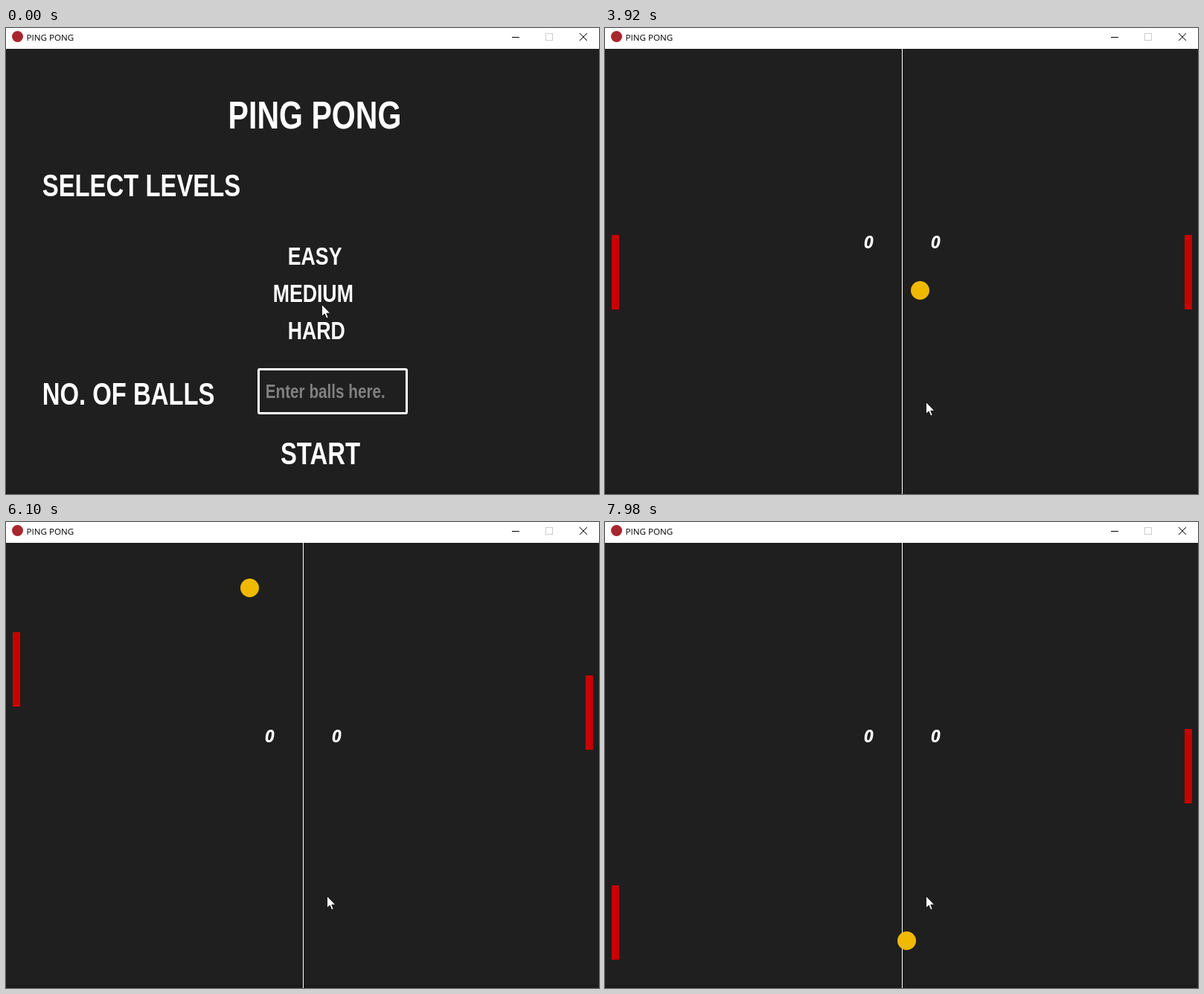
These frames come from a looping animation (797x626 px, 8 s). An HTML page:

```html
<!DOCTYPE html>
<html lang="en">
<head>
<meta charset="utf-8">
<title>Ping Pong</title>
<style>
  html, body { margin: 0; width: 100%; height: 100%; overflow: hidden; background: #1f1f1f; }
  svg { display: block; }
  .caption { font: 11.6px "Open Sans", "Noto Sans", sans-serif; }
  .labels { font-family: "Liberation Sans", Arial, sans-serif; font-weight: bold; fill: #fff; }
  .title { font-size: 52px; }
  .heading { font-size: 41.6px; }
  .level { font-size: 33.8px; }
  .hint { font-size: 26.2px; fill: #808080; }
  .score { font: italic bold 23px "Open Sans", "Noto Sans", sans-serif; fill: #fff; }
  .paddle { fill: #c80000; }
  .crisp { shape-rendering: crispEdges; }
</style>
</head>
<body>
<svg width="797" height="626" viewBox="0 0 797 626">
  <rect width="797" height="626" fill="#1f1f1f"/>
  <rect y="622" width="797" height="4" fill="#1b1b1b"/>

  <g id="menu">
    <!-- condensed face -->
    <g class="labels" transform="scale(.79 1)">
      <text class="title" x="378" y="135.5">PING PONG</text>
      <text class="heading" x="61.7" y="226.5">SELECT LEVELS</text>
      <text class="level" x="479.5" y="318">EASY</text>
      <text class="level" x="454" y="368">MEDIUM</text>
      <text class="level" x="479.5" y="418">HARD</text>
      <text class="heading" x="61.7" y="506.5">NO. OF BALLS</text>
      <text class="hint" id="hint" x="441.5" y="497">Enter balls here.</text>
      <text class="heading" id="entry" x="441.5" y="501">1</text>
      <text class="heading" x="467" y="586.5">START</text>
    </g>
    <rect x="339.5" y="458.5" width="199" height="59" rx="1.5" fill="none" stroke="#fff" stroke-width="3"/>
    <rect id="choice" x="350.5" y="329.5" width="124" height="54" rx="9" fill="none" stroke="#efb900" stroke-width="3"/>
  </g>

  <g id="game">
    <rect class="crisp" x="399" y="28" width="1" height="598" fill="#fff"/>
    <text class="score" x="348" y="296">0</text>
    <text class="score" x="438" y="296">0</text>
    <rect class="paddle crisp" id="left" x="9" width="10" height="100"/>
    <rect class="paddle crisp" id="right" x="779" width="10" height="100"/>
    <circle id="ball" r="12.5" fill="#efb900"/>
  </g>

  <path id="cursor" d="M.5 .5V16.5L4.2 13L6.8 19L9.2 18L6.8 12.2H11.8Z" fill="#fff" stroke="#000" stroke-width=".8"/>

  <rect width="797" height="28" fill="#fff"/>
  <circle cx="15.5" cy="11.5" r="7.5" fill="#a8262e"/>
  <text class="caption" x="27.5" y="17">PING PONG</text>
  <g fill="none" stroke="#000">
    <path d="M680 12.5H690"/>
    <rect x="725.5" y="7.5" width="9" height="9" stroke="#ccc"/>
    <path d="M771 7L781 17M781 7L771 17"/>
  </g>
</svg>
<script>
const LOOP = 8000, SERVE = 3920;
const REFRESH = 78;            // ms between screen updates
const TICKS_PER_REFRESH = 4.73;
const BALL_STEP = 6, LEFT_STEP = 5, RIGHT_STEP = 8;

const el = id => document.getElementById(id);
const clamp = (v, lo, hi) => Math.min(hi, Math.max(lo, v));

// Folds straight travel into bounces between two walls.
function bounce(distance, lo, hi) {
  const span = hi - lo;
  const d = (distance - lo) % (2 * span);
  return lo + span - Math.abs(d - span);
}

// Progress from 0 to 1 in equal jumps, the first one at the start.
function jumps(t, start, count) {
  return clamp(Math.floor((t - start) / 80) + 1, 0, count) / count;
}

function bezier(a, b, c, d, p) {
  const q = 1 - p;
  return a * q ** 3 + 3 * b * q * q * p + 3 * c * q * p * p + d * p ** 3;
}

function show(id, on) {
  el(id).style.display = on ? "" : "none";
}

function drawCursor(t) {
  const nudge = 25 * (1 - jumps(t, 90, 2));
  const swing = jumps(t, 950, 7);
  const x = bezier(424, 365, 415, 431, swing);
  const y = bezier(346, 346, 665, 502, swing) + nudge;
  el("cursor").setAttribute("transform", `translate(${Math.round(x)} ${Math.round(y)})`);
}

function drawGame(t) {
  // The screen updates run slightly ahead of the serve.
  const tick = Math.floor(Math.floor((t - SERVE + 18) / REFRESH) * TICKS_PER_REFRESH);
  const held = (from, to) => clamp(tick, from, to) - from;

  el("ball").setAttribute("cx", bounce(423.5 + BALL_STEP * tick, 27.5, 771.5));
  el("ball").setAttribute("cy", bounce(352.5 + BALL_STEP * tick, 40.5, 616.5));
  el("left").setAttribute("y", 278 + LEFT_STEP * (held(44, 74) - held(76, 147) + held(159, 242)));
  el("right").setAttribute("y", 278 + RIGHT_STEP * (held(20, 47) - held(88, 124) + held(236, 245)));
}

function draw(t) {
  const playing = t >= SERVE;
  show("menu", !playing);
  show("game", playing);
  show("choice", t >= 720);
  show("hint", t < 2440);
  show("entry", t >= 2440);
  drawCursor(t);
  if (playing) drawGame(t);
}

const start = performance.now();
function frame() {
  draw((performance.now() - start) % LOOP);
  requestAnimationFrame(frame);
}
frame();
</script>
</body>
</html>
```
